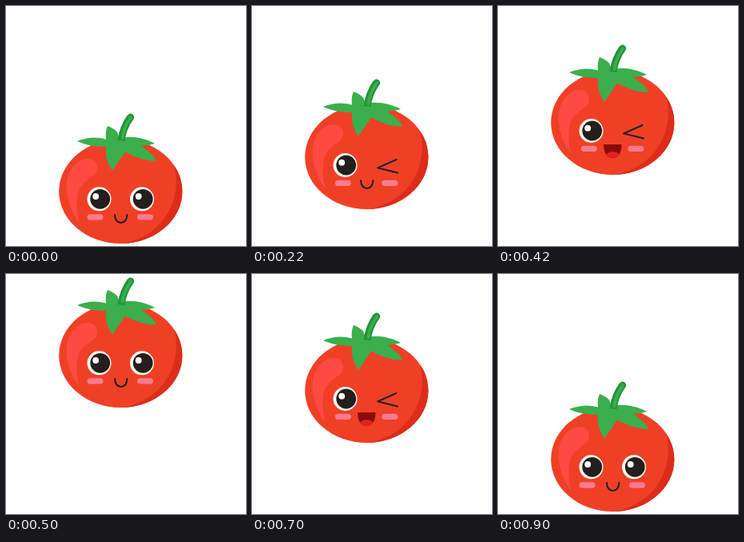
Write an HTML page that moves like this. It is 300x300 px and loops after 1000 ms.

```html
<!DOCTYPE html>
<html lang="en">
<head>
<meta charset="utf-8">
<title>Hopping tomato</title>
<style>
  html, body { margin: 0; width: 100%; height: 100%; overflow: hidden; background: #fff; }
  svg { display: block; width: 100vw; height: 100vh; }

  .tomato, .calm, .wink, .smile, .laugh { animation: 1s step-end infinite; }
  .tomato { animation-name: hop; }
  .calm { animation-name: calm; }
  .wink { animation-name: wink; }
  .smile { animation-name: smile; }
  .laugh { animation-name: laugh; }

  @keyframes hop {
    0%, 90%, 100% { transform: translateY(0); }
    10%, 80% { transform: translateY(-43px); }
    30%, 70% { transform: translateY(-86px); }
    50% { transform: translateY(-130px); }
  }
  @keyframes calm {
    0%, 50%, 90%, 100% { visibility: visible; }
    10%, 70% { visibility: hidden; }
  }
  @keyframes wink {
    0%, 50%, 90%, 100% { visibility: hidden; }
    10%, 70% { visibility: visible; }
  }
  @keyframes smile {
    0%, 50%, 80%, 100% { visibility: visible; }
    30%, 70% { visibility: hidden; }
  }
  @keyframes laugh {
    0%, 50%, 80%, 100% { visibility: hidden; }
    30%, 70% { visibility: visible; }
  }

  .line { fill: none; stroke: #231f20; stroke-width: 2; stroke-linecap: round; stroke-linejoin: round; }
  .cheek { fill: #fb7a90; }
</style>
</head>
<body>
<svg viewBox="0 0 300 300">
  <defs>
    <clipPath id="skin"><ellipse cx="143.3" cy="231.7" rx="77.1" ry="65.3"/></clipPath>
    <clipPath id="lips"><path id="mouth" d="M132 259H154.500C154.500 270 150 276 143.300 276S132 270 132 259Z"/></clipPath>
    <g id="eye">
      <circle r="15" fill="#fffdf3"/>
      <circle cx="1.200" r="12.400" fill="#231f1c"/>
      <circle cx="-4.300" cy="-3.300" r="3.900" fill="#fff"/>
    </g>
    <rect id="cheek" class="cheek" x="-10" y="-3.600" width="20" height="7.200" rx="3.600"/>
  </defs>

  <g class="tomato">
    <g clip-path="url(#skin)">
      <rect x="60" y="160" width="170" height="140" fill="#ef4026"/>
      <path d="M208 192C222 228 207 287 143 297.500H230V192Z" fill="#dc2d1a"/>
    </g>
    <path d="M91.500 271C80 256 71 229 78 211C83 198 93 190.500 103 191C113 191.500 117 202 112 209C106 217 92 219 89 238C87.500 250 89 261 91.500 271Z" fill="#ff4a42"/>

    <path d="M89 169C101 164 113 163 125 166.500C124 160 125 154 127 150C132 152 136 154 139 157.500L142 165C157 162 173 165 186 172C180 174 174 174.500 169 174.500C176 181 185 185 188 193.500C173 194 160 188 149 182.500C144 190 138 198 133 206C127 197 124 188 125 176C112 176 100 174 89 169Z" fill="#3aaf4c"/>
    <path d="M144 168.500C145.500 157 149 148 155.500 139" fill="none" stroke="#23963b" stroke-width="9"/>
    <circle cx="155.800" cy="139" r="4.400" fill="#23963b"/>
    <path d="M145.500 165C146.500 156 150.500 147 156 139.500" fill="none" stroke="#3aaf4c" stroke-width="3.600" stroke-linecap="round"/>

    <g class="calm">
      <use href="#eye" x="116.500" y="241.300"/>
      <use href="#eye" x="170" y="241.300"/>
      <use href="#eye" x="0" y="0" visibility="hidden"/>
      <use href="#cheek" x="111.500" y="263.800"/>
      <use href="#cheek" x="174" y="263.800"/>
    </g>

    <g class="wink">
      <use href="#eye" x="116.500" y="242"/>
      <path class="line" d="M180.500 235L157 245.300L182 251.500"/>
      <use href="#cheek" x="113.800" y="264.300"/>
      <use href="#cheek" x="172.300" y="264.300"/>
    </g>

    <path class="smile line" d="M136 261C136 274.300 151.300 274.300 151.300 261"/>

    <g class="laugh">
      <use href="#mouth" fill="#8b0b0c"/>
      <ellipse cx="143.500" cy="274" rx="9" ry="6" fill="#e0231c" clip-path="url(#lips)"/>
    </g>
  </g>
</svg>
</body>
</html>
```
